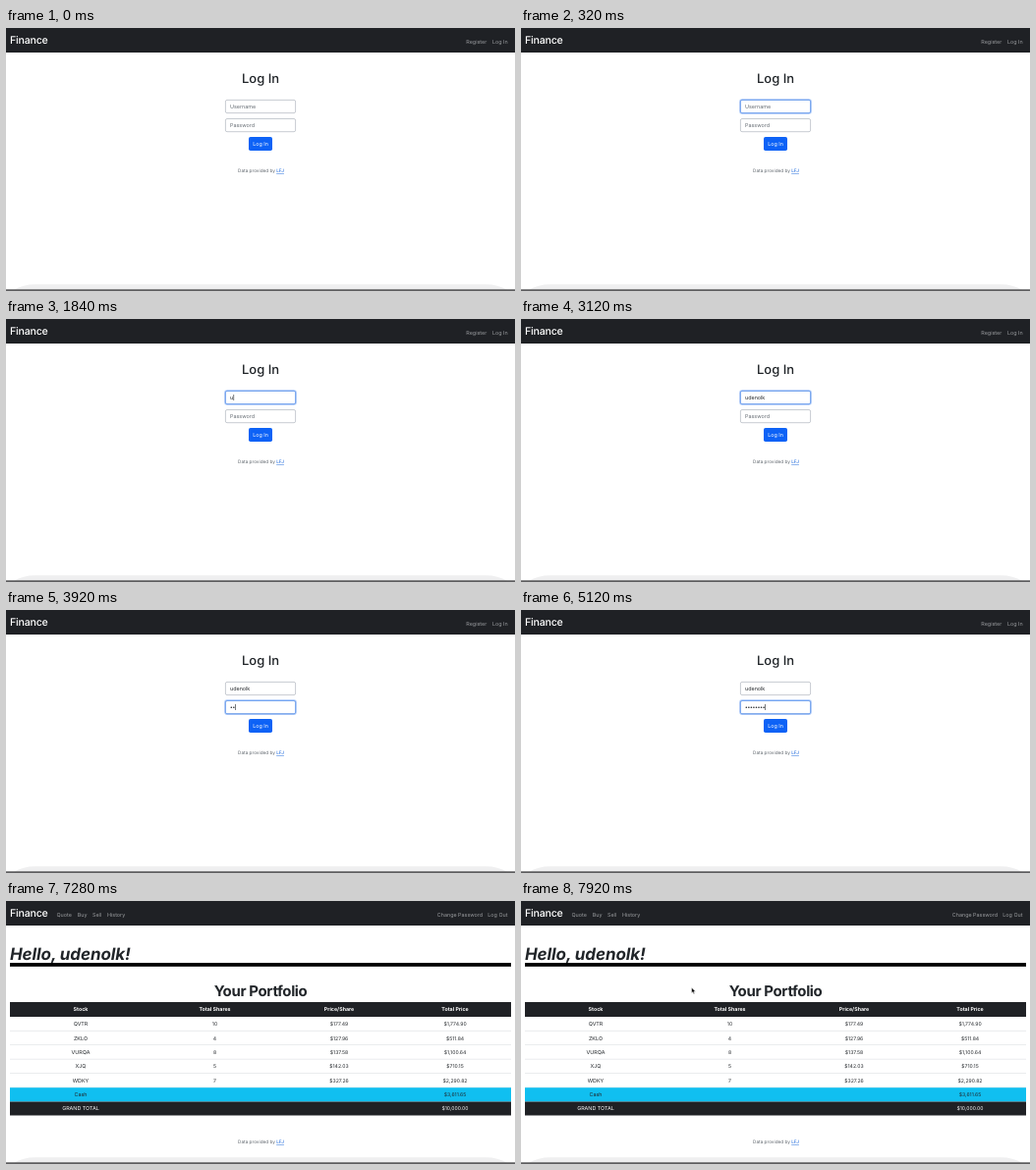
These frames come from a looping animation (518x268 px, 8000 ms). An HTML page:

```html
<!DOCTYPE html>
<html lang="en">
<head>
<meta charset="utf-8">
<title>Finance</title>
<style>
  html, body { margin: 0; width: 100%; height: 100%; overflow: hidden; background: #fff; }
  svg { display: block; width: 100%; height: 100%; }
  text { font-family: Inter, Roboto, sans-serif; font-size: 5.4px; fill: #212529; text-rendering: geometricPrecision; }
  .brand { font-size: 10.6px; font-weight: 500; letter-spacing: -.2px; fill: #fff; }
  .nav text { fill: #9c9ea1; }
  .mid { text-anchor: middle; }
  .title { font-size: 13px; font-weight: 500; }
  .hint { fill: #646b72; }
  .foot { font-size: 4.7px; fill: #5c636a; }
  .foot tspan { fill: #0d5ed8; text-decoration: underline; }
  .hello { font-size: 17px; font-weight: 700; font-style: italic; letter-spacing: -.1px; }
  .heading { font-size: 15px; font-weight: 700; letter-spacing: -.37px; }
  .head { font-weight: 700; font-size: 5.3px; }
  .num { font-size: 5.1px; }
  .light { fill: #fff; }
</style>
</head>
<body>
<svg id="stage" viewBox="0 0 518 268" preserveAspectRatio="none" xmlns="http://www.w3.org/2000/svg">
  <rect width="518" height="268" fill="#fff"/>
  <rect width="518" height="25" fill="#1f2125"/>
  <text class="brand" x="4" y="16.4">Finance</text>

  <g id="login">
    <g class="nav">
      <text x="468.3" y="15.5">Register</text>
      <text x="495" y="15.5">Log In</text>
    </g>
    <text class="title mid" x="259" y="56">Log In</text>
    <g id="fields"></g>
    <text id="userHint" class="hint" x="228" y="82">Username</text>
    <text id="user" x="228" y="82"></text>
    <text id="passHint" class="hint" x="228" y="101.2">Password</text>
    <g id="dots" fill="#212529"></g>
    <rect id="caret" width=".6" height="6" fill="#212529"/>
    <rect x="247" y="111" width="24" height="14" rx="1.8" fill="#0d62f6"/>
    <text class="light mid" x="259" y="120">Log In</text>
    <text class="foot mid" x="259.5" y="147">Data provided by <tspan>LFJ</tspan></text>
  </g>

  <g id="portfolio">
    <g id="links" class="nav"></g>
    <text class="hello" x="4" y="59.7">Hello, udenolk!</text>
    <rect x="4" y="63" width="510" height="3.8" fill="#000"/>
    <text class="heading mid" x="259" y="97">Your Portfolio</text>
    <g id="table"></g>
    <text class="foot mid" x="259.5" y="247">Data provided by <tspan>LFJ</tspan></text>
  </g>

  <path d="M8 267Q17 261.3 30 261.3H488Q501 261.3 510 267Z" fill="#efeff0"/>
  <rect y="266.3" width="518" height="1.7" fill="#5a5a5c"/>
  <path id="cursor" d="M0 0V5.6L1.3 4.5L2.2 6.5L3.1 6.1L2.2 4.1H4Z" fill="#000" stroke="#fff" stroke-width=".5"/>
</svg>
<script>
const NS = 'http://www.w3.org/2000/svg';
const LOOP = 8000, STEP = 80;
const NAME = 'udenolk';
const NAME_START = 1840, KEY_GAP = 160, NAME_CARET_OFF = 2960;
const TAB = 3200, PAGE = 7280;
const DOT_KEYS = [3680, 3840, 4000, 4160, 4320, 4560, 4800, 5120, 5520, 5600];
const ERASE = 6240, DOT_GAP = 2.54;
const $ = id => document.getElementById(id);

function add(parent, tag, attrs, text) {
  const el = document.createElementNS(NS, tag);
  for (const key in attrs) el.setAttribute(key, attrs[key]);
  if (text !== undefined) el.textContent = text;
  parent.appendChild(el);
  return el;
}
const show = (el, on) => el.setAttribute('visibility', on ? 'visible' : 'hidden');
const clamp = v => Math.max(0, Math.min(1, v));
const smooth = v => v * v * (3 - 2 * v);
const mix = (a, b, k) => a + (b - a) * k;

function makeField(y) {
  const g = $('fields');
  const box = { x: 223.4, y, width: 71.2, height: 13.2, rx: 1.6 };
  const glow = add(g, 'rect', { ...box, fill: 'none', stroke: '#a9c8fb', 'stroke-width': 2.4 });
  add(g, 'rect', { ...box, fill: '#fff', stroke: '#b9bec6', 'stroke-width': .8 });
  const edge = add(g, 'rect', { ...box, fill: 'none', stroke: '#6ea2f5', 'stroke-width': .9 });
  return k => [glow, edge].forEach(el => el.setAttribute('opacity', k));
}
const focusUser = makeField(73.4);
const focusPass = makeField(92.5);

const dots = DOT_KEYS.map((_, i) =>
  add($('dots'), 'circle', { cx: 229.3 + i * DOT_GAP, cy: 99.2, r: .8 }));

[['Quote', 51.5], ['Buy', 72.7], ['Sell', 88], ['History', 103], ['Change Password', 438.8], ['Log Out', 490.3]]
  .forEach(([label, x]) => add($('links'), 'text', { x, y: 15.5 }, label));

const COLUMNS = [76, 212.5, 339, 457];
function makeRow(y, height, cells, fill, style = '') {
  const g = $('table');
  if (fill) add(g, 'rect', { x: 4, y, width: 510, height, fill });
  else add(g, 'rect', { x: 4, y: y + height - .5, width: 510, height: .5, fill: '#d5d8dc' });
  cells.forEach((cell, i) => {
    const num = /\d/.test(cell) ? ' num' : '';
    add(g, 'text', { x: COLUMNS[i], y: y + height / 2 + 1.9, class: `mid ${style}${num}` }, cell);
  });
}
makeRow(103, 15, ['Stock', 'Total Shares', 'Price/Share', 'Total Price'], '#1f2125', 'head light');
[
  ['QVTR', '10', '$177.49', '$1,774.90'],
  ['ZKLO', '4', '$127.96', '$511.84'],
  ['VURQA', '8', '$137.58', '$1,100.64'],
  ['XJQ', '5', '$142.03', '$710.15'],
  ['WDKY', '7', '$327.26', '$2,290.82']
].forEach((cells, i) => makeRow(118 + i * 14.45, 14.45, cells));
makeRow(190.2, 14.3, ['Cash', '', '', '$3,611.65'], '#10bff0');
makeRow(204.5, 14, ['GRAND TOTAL', '', '', '$10,000.00'], '#1f2125', 'light');

function drawCaret(t, typed, count) {
  const inName = typed > 0 && t < NAME_CARET_OFF;
  const inPass = t >= TAB && t < 6640 && !(t >= 6080 && t < ERASE);
  show($('caret'), t < PAGE && (inName || inPass));
  const x = inName ? 228.3 + $('user').getComputedTextLength() : 228 + count * DOT_GAP;
  $('caret').setAttribute('x', x);
  $('caret').setAttribute('y', inName ? 77 : 96);
}

function drawCursor(t) {
  const first = t >= 720 && t < 1760;
  const second = t > PAGE;
  show($('cursor'), first || second);
  let x, y;
  if (first) {
    const k = smooth(clamp((t - 960) / 720));
    x = mix(516, 257, k);
    y = mix(3, 112, k);
  } else {
    const k = smooth(clamp((t - PAGE) / 640));
    x = mix(257, 173.6, k);
    y = mix(112, 88.2, k);
  }
  $('cursor').setAttribute('transform', `translate(${x} ${y})`);
}

function draw(time) {
  const t = Math.floor((time % LOOP) / STEP) * STEP;
  const loggedIn = t >= PAGE;
  $('login').setAttribute('display', loggedIn ? 'none' : 'inline');
  $('portfolio').setAttribute('display', loggedIn ? 'inline' : 'none');

  const typed = Math.max(0, Math.min(NAME.length, Math.floor((t - NAME_START) / KEY_GAP) + 1));
  $('user').textContent = NAME.slice(0, typed);
  show($('userHint'), !loggedIn && typed === 0);

  const pressed = DOT_KEYS.filter(at => t >= at).length;
  const count = t >= ERASE ? pressed - 1 : pressed;
  dots.forEach((dot, i) => dot.setAttribute('opacity', i < count ? 1 : 0));
  show($('passHint'), !loggedIn && count === 0);

  const moved = clamp((t - TAB + STEP) / 240);
  focusUser(clamp(t / 240) * (1 - moved));
  focusPass(moved);
  drawCaret(t, typed, count);
  drawCursor(t);
}

let start;
function tick(now) {
  if (start === undefined) start = now;
  draw(now - start);
  requestAnimationFrame(tick);
}
draw(0);
requestAnimationFrame(tick);
</script>
</body>
</html>
```
